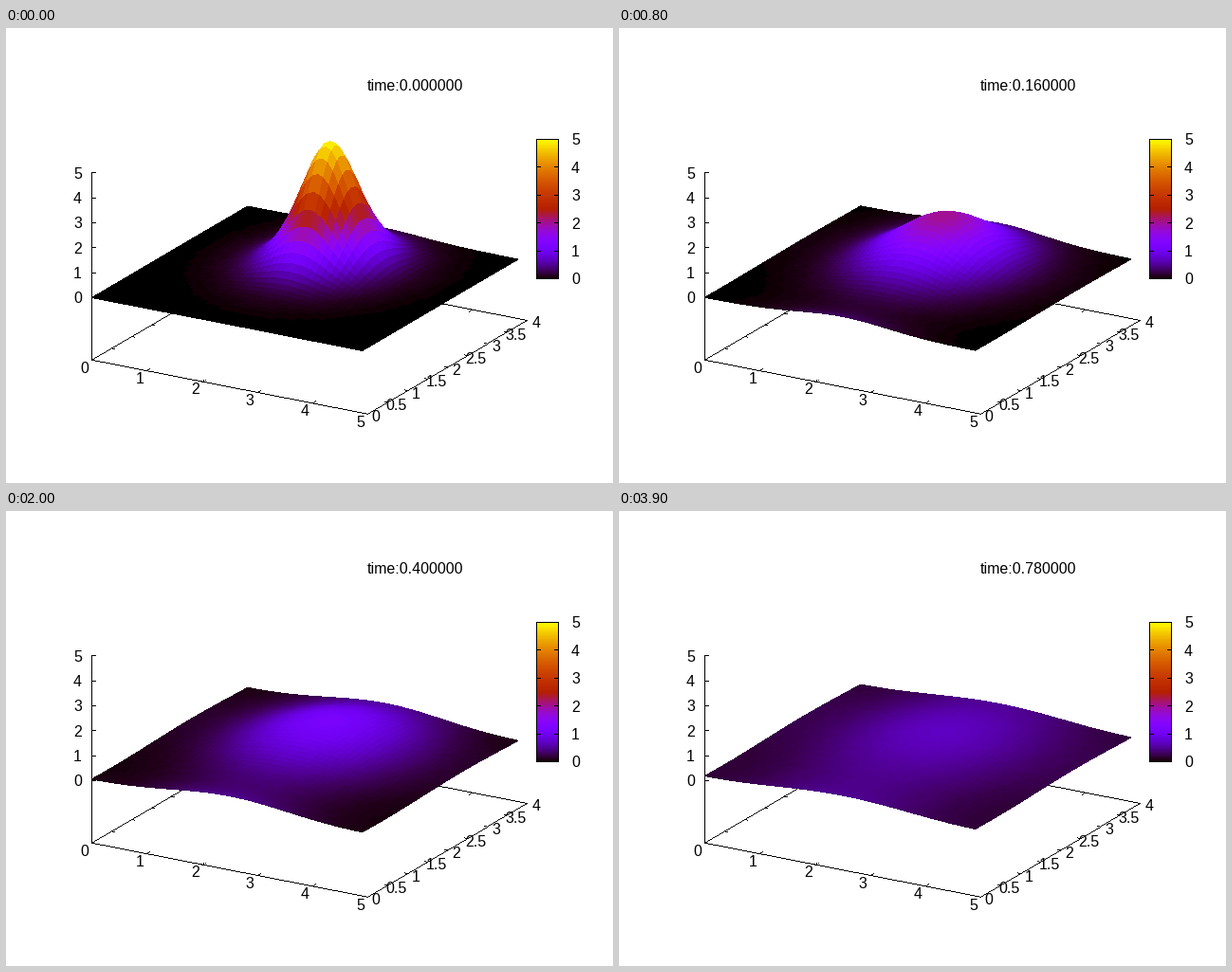
Animation of 640 by 480 pixels, one loop 4000 ms. Source, as a matplotlib script:

```python
import numpy as np
import matplotlib.pyplot as plt
from matplotlib.animation import FuncAnimation
from matplotlib.collections import PolyCollection

W, H, DPI = 640, 480, 100
PX = 72 / DPI                      # one pixel in points
FRAMES, INTERVAL = 40, 100
DT = 0.02
LX, LY, STEP = 5.0, 4.0, 0.1       # periodic domain and grid step
CX, CY, PEAK, SHARPNESS = 2.5, 2.5, 5.0, 1.65
ZMAX, LEVELS = 5.0, 256
FLOOR = -2.5                       # height of the base plane

plt.rcParams["font.family"] = "Liberation Sans"
fig = plt.figure(figsize=(W / DPI, H / DPI), dpi=DPI, facecolor="white")
ax = fig.add_axes([0, 0, 1, 1])

# Static lines and the colour bar are painted pixel by pixel
canvas = np.zeros((H, W, 4))


def project(x, y, z):
    """Data coordinates to stage pixels."""
    return (90.2 + 58.15 * x + 42.1 * y,
            284.0 + 11.4 * x - 24.7 * y - 26.3 * z)


def palette(z):
    g = np.floor(np.clip(z / ZMAX, 0, 1) * LEVELS)
    g = np.minimum(g, LEVELS - 1) / (LEVELS - 1)
    blue = np.clip(np.sin(2 * np.pi * g), 0, 1)
    return np.stack([np.sqrt(g), g ** 3, blue], axis=-1)


def line(p, q):
    """Black line one pixel wide, without smoothing."""
    n = int(np.ceil(max(abs(q[0] - p[0]), abs(q[1] - p[1])))) + 1
    cols = np.rint(np.linspace(p[0], q[0], n)).astype(int)
    rows = np.rint(np.linspace(p[1], q[1], n)).astype(int)
    canvas[rows, cols] = (0, 0, 0, 1)


def tick(p, dx, dy):
    line(p, (p[0] + dx, p[1] + dy))


def label(x, y, s, ha="center"):
    """Text whose digits are centred on y."""
    return ax.text(x, y + 5.8, s, fontsize=16 * PX, color="black",
                   ha=ha, va="baseline", zorder=5)


def draw_axes():
    base = [project(x, y, FLOOR)
            for x, y in ((0, 0), (LX, 0), (LX, LY), (0, LY))]
    for p, q in zip(base, base[1:] + base[:1]):
        line(p, q)
    line(base[0], project(0, 0, ZMAX))

    for v in range(6):
        p = project(v, 0, FLOOR)
        label(p[0] - 7.8, p[1] + 7.6, str(v))
        if 0 < v < LX:
            tick(p, 3, -2)
            tick(project(v, LY, FLOOR), -3, 2)
        p = project(0, 0, v)
        tick(p, 4, 0)
        label(75, p[1], str(v))

    for v in np.arange(0, LY + 0.1, 0.5):
        p = project(LX, v, FLOOR)
        label(p[0] + 8.8, p[1] + 2.2, f"{v:g}")
        if 0 < v < LY:
            tick(p, -3, -0.6)
            tick(project(0, v, FLOOR), 3, 0.6)


def draw_colorbar(left=559, right=582, top=117, bottom=264):
    ramp = palette(np.linspace(ZMAX, 0, bottom - top + 1))
    canvas[top:bottom + 1, left:right + 1, :3] = ramp[:, None, :]
    canvas[top:bottom + 1, left:right + 1, 3] = 1
    box = [(left, top), (right, top), (right, bottom), (left, bottom)]
    for p, q in zip(box, box[1:] + box[:1]):
        line(p, q)
    for v in range(6):
        y = bottom - v * (bottom - top) / 5
        tick((left, y), 4, 0)
        tick((right, y), -4, 0)
        label(600, y, str(v))


def corners(a):
    """Four corners of every cell, ordered from back to front."""
    a = a[::-1]
    quads = np.stack([a[:-1, :-1], a[:-1, 1:], a[1:, 1:], a[1:, :-1]], axis=-1)
    return quads.reshape(-1, 4)


def decay(n):
    """Decay rates of the periodic modes of the discrete Laplacian."""
    return (2 * np.sin(np.pi * np.arange(n) / n) / STEP) ** 2


nx, ny = round(LX / STEP), round(LY / STEP)
gx, gy = np.meshgrid(np.arange(nx) * STEP, np.arange(ny) * STEP)
start = PEAK / np.cosh(SHARPNESS * np.hypot(gx - CX, gy - CY)) ** 2
modes = np.fft.fft2(start)
rates = decay(ny)[:, None] + decay(nx)[None, :]


def heights(t):
    return np.fft.ifft2(modes * np.exp(-rates * t)).real


draw_axes()
draw_colorbar()
ax.imshow(canvas, extent=(-0.5, W - 0.5, H - 0.5, -0.5), aspect="auto",
          interpolation="nearest", zorder=1)
ax.axis("off")

surface = PolyCollection([], edgecolors="none", linewidths=0,
                         antialiaseds=False, zorder=2)
surface.set_snap(False)
ax.add_collection(surface, autolim=False)
clock = label(380, 60.2, "", ha="left")


def update(k):
    t = k * DT
    z = heights(t)
    px, py = project(gx, gy, z)
    surface.set_verts(np.stack([corners(px), corners(py)], axis=-1))
    surface.set_facecolor(palette(corners(z).mean(axis=1)))
    clock.set_text(f"time:{t:.6f}")
    return surface, clock


anim = FuncAnimation(fig, update, frames=FRAMES, interval=INTERVAL,
                     init_func=lambda: update(0), repeat=True,
                     repeat_delay=0, blit=False)
plt.show()
```
